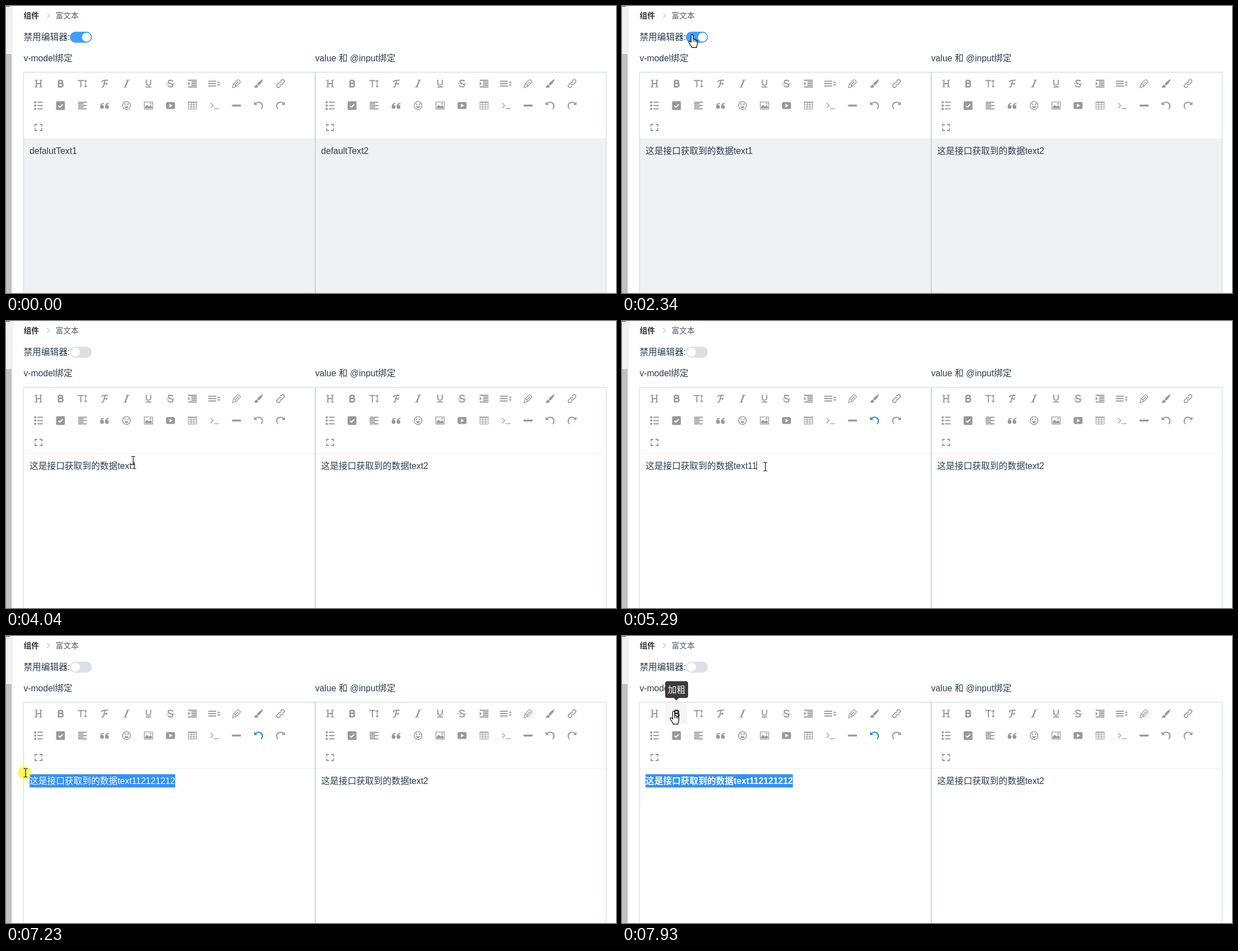
Animation of 1089x514 px, one loop 8000 ms. Source, as an HTML page:

```html
<!DOCTYPE html>
<html lang="zh-CN">
<head>
<meta charset="utf-8">
<title>富文本</title>
<style>
html, body { margin: 0; width: 100%; height: 100%; overflow: hidden; background: #fff; }
svg { display: block; }
text { font: 15.72px "Liberation Sans", Arial, "Noto Sans CJK SC", "Noto Sans CJK", sans-serif; fill: #2c3e50; white-space: pre; }
.crumb { font-size: 13.75px; fill: #515a6e; }
.home { font-weight: 700; fill: #303133; }
.icon { color: #999; fill: none; stroke: currentColor; stroke-width: 2; }
.icon.hover { color: #333; }
.icon.undo { color: #1e88e5; }
.hair { stroke-width: 1; }
.thin { stroke-width: 1.3; }
.mid { stroke-width: 1.6; }
.fat { stroke-width: 3.4; }
.fill { fill: currentColor; stroke: none; }
.cut { fill: none; stroke: #fff; }
.hole { fill: #fff; stroke: none; }
.edge { fill: none; stroke: #c9d8db; }
.bold { font-weight: 700; }
.white { fill: #fff; }
</style>
</head>
<body>
<svg id="stage" width="1089" height="514" viewBox="0 0 1089 514">
  <path d="M0 0H12V514H0Z" fill="#f0f1f1"/>
  <path d="M0 86H10V514H0Z" fill="#c1c1c1"/>
  <path d="M0 0H7V1H0Z" fill="#444"/>
  <text class="crumb home" x="31.4" y="22">组件</text>
  <path d="M73.5 12.5L78 17L73.5 21.5" fill="none" stroke="#b9cdd0" stroke-width="1.2"/>
  <text class="crumb" x="88.4" y="22">富文本</text>
  <text x="31.4" y="61">禁用编辑器:</text>
  <rect id="track" x="114" y="46" width="39.3" height="19.7" rx="9.85"/>
  <circle id="knob" cy="55.9" r="7.9" fill="#fff"/>
  <text x="31.4" y="99">v-model绑定</text>
  <text x="552" y="99">value 和 @input绑定</text>
  <rect id="hoverBox" width="39.3" height="39.3" fill="#f6f6f6"/>
  <path id="areas" d="M32 237H551V514H32ZM553 237H1071V514H553Z" fill="#f0f1f3"/>
  <path class="edge" d="M31.5 514V118.5H551.5V514M552.5 514V118.5H1071.5V514"/>
  <path d="M32 237.5H551M553 237.5H1071" stroke="#eceeee"/>
  <g id="tools"></g>
  <text id="left" x="42" y="265"></text>
  <text id="right" x="562.5" y="265"></text>
  <clipPath id="clip"><rect id="range" y="247.6" height="23.6"/></clipPath>
  <g id="selected" clip-path="url(#clip)">
    <path d="M40 247H320V272H40Z" fill="#3390ff"/>
    <text id="leftSel" class="white" x="42" y="265"></text>
  </g>
  <path id="caret" d="M.5 251V267" stroke="#222"/>
  <g id="tip">
    <rect x="77" y="81" width="41" height="30" rx="4" fill="#3b3b3b"/>
    <path d="M92 110.5H102L97 115.5Z" fill="#3b3b3b"/>
    <text class="white" x="81.8" y="102">加粗</text>
  </g>
  <g id="mouse">
    <circle id="ring" r="12" fill="#fff200" opacity=".6"/>
    <path id="arrow" d="M.5 .5V16.2L4.2 12.7L6.8 18.6L9.2 17.5L6.6 11.8H11.6Z" fill="#fff" stroke="#000"/>
    <g id="hand">
      <path d="M-.6 14V2.2A1.8 1.8 0 0 1 3 2.2V9C3 7.4 6 7.4 6 9V10C6 8.5 8.4 8.7 8.4 10.2V11.2C8.4 9.9 10.5 10 10.5 11.7V17C10.5 20 8.8 21 8.8 23.4H.8C.8 21 -3 18 -4.8 14.2C-5.6 12 -3.4 11.2 -2.2 12.6Z" fill="#fff" stroke="#000" stroke-width="1.2"/>
      <path d="M3 9V13M6 10V13M8.4 11V14" stroke="#000"/>
    </g>
    <path id="beam" d="M-3.5 -7.5H-1L0 -6.7L1 -7.5H3.5M0 -6.7V6.7M-3.5 7.5H-1L0 6.7L1 7.5H3.5" fill="none" stroke="#111" stroke-width="1.2"/>
  </g>
</svg>
<script>
const $ = id => document.getElementById(id);
const path = (d, cls = '') => `<path class="${cls}" d="${d}"/>`;
const LOOP = 8000, CELL = 39.28, TICK = 77.5, TEXT_X = 42, COLS = 12;

// Five evenly spaced bars; each piece of reach is "from H to" for one bar
const bars = (...reach) => path(reach.map(([a, b], i) => `M${a} ${(i - 2) * 2.95}H${b}`).join(''));
const wide = [-7.85, 7.85], short = [-7.85, 2], inset = [-2, 7.85];
const dot = y => `<circle class="fill" cx="-5.9" cy="${y}" r="2"/>` + path(`M-2 ${y}H7.85`);
const quote = x => `<circle class="fill" cx="${x}" cy="2.45" r="3.4"/>` + path(`M${x - 2.4} 2C${x - 2.4} -1.5 ${x - .5} -3.8 ${x + 3.4} -3.9`);
const undo = path('M-7.85 -6.9V-1H-2Z', 'fill') + path('M-5.2 -3.6A6.87 6.87 0 0 1 6.87 1Q6.87 4 4.7 6.2');

const icons = [
  path('M-4 -6V6M4 -6V6M-4 0H4') + path('M-7 -6.2H-1.5M1.5 -6.2H7M-7 6.2H-1.5M1.5 6.2H7', 'thin'),
  `<path stroke-width="2.7" d="M-3.4 -5.6V5.6H1.4A3 3 0 0 0 1.4 -.4H-3.4M-3.4 -5.6H1A2.6 2.6 0 0 1 1 -.4"/>`,
  path('M-8.5 -5.6H2.5M-3 -5.6V6.5') + path('M5.5 -5.5V5.5M3.3 -3.8L5.5 -6.2L7.7 -3.8M3.3 3.8L5.5 6.2L7.7 3.8', 'thin'),
  path('M-5 5.5C-3 7.5 -1.8 5.5 -1 2L1 -5.5') + path('M-4.5 -2.5C-5 -6.3 -1 -5.8 6.5 -6.2M-2 .2H4M4 -1.8V2'),
  `<path stroke-width="2.6" d="M2.4 -6L-2.4 6"/>` + path('M-1 -6.4H5.9M-5.9 6.4H1', 'hair'),
  path('M-3.9 -6.9V-.5C-3.9 4 3.9 4 3.9 -.5V-6.9M-4.9 5.9H4.9'),
  path('M4.2 -3.6C3.6 -7 -4 -6.8 -4 -3.4C-4 .3 4.2 -.6 4.2 3.2C4.2 6.8 -4 6.9 -4.6 3.2') + path('M-7.85 .5H7.85', 'hair'),
  bars(wide, inset, inset, inset, wide) + path('M-7.85 -3L-3.9 0L-7.85 3Z', 'fill'),
  path('M-11 -4.2H3M-11 0H3M-11 4.2H3') + path('M4.5 -1.2L7.5 -4.2L10.5 -1.2ZM4.5 1.2L7.5 4.2L10.5 1.2Z', 'fill'),
  path('M-7.3 7.3L-5.6 .8L2 -6.8C3.5 -8 8 -3.8 6.6 -2.2L-1 5.4ZM-5.6 .8C-3 .8 -1 3 -1 5.4M-3 3L4 -4', 'thin'),
  path('M8.2 -8C4 -6.3 -1.2 -2 -2.6 1L.2 3.6C3 1.6 7.5 -4 8.2 -8ZM-3.6 1.7C-6.4 1.6 -5 5 -8.2 6.2C-5.4 8.8 .4 7.4 -.8 4.2Z', 'fill'),
  [0, 180].map(a => `<g transform="rotate(${a})">${path('M-1.6 1.6A3.1 3.1 0 0 0 2.6 1.4L6.2 -2.2A3 3 0 0 0 2 -6.4L-.3 -4.2', 'mid')}</g>`).join(''),
  [-5.9, 0, 5.9].map(dot).join(''),
  '<rect class="fill" x="-7.85" y="-7.85" width="15.7" height="15.7" rx="2"/>' + path('M-3.5 .4L-1 2.9L3.9 -2', 'cut'),
  bars(wide, short, wide, short, wide),
  quote(-4.4) + quote(4.4),
  '<circle class="mid" r="7"/>' + path('M-3.8 1.2H3.8C3.2 5.8 -3.2 5.8 -3.8 1.2Z', 'fill') + path('M-2.6 -3.8V-1M2.6 -3.8V-1'),
  path('M-7.4 -6.4H7.4V6.4H-7.4Z', 'thin') + path('M-6 5V2.5L-2.5 -1.5L.5 2L3.5 -.5L6 2V5ZM2 -3.2A1.5 1.5 0 1 0 5 -3.2A1.5 1.5 0 1 0 2 -3.2Z', 'fill'),
  '<rect class="fill" x="-8" y="-6.3" width="16" height="12.6" rx="3"/>' + path('M-2 -3.4L3.6 0L-2 3.4Z', 'hole'),
  path('M-7.85 -5.9H7.85') + path('M-7.4 -5.9V6.4H7.4V-5.9M-7.4 -1.5H7.4M-7.4 2.45H7.4M-2.45 -5.9V6.4M2.45 -5.9V6.4', 'hair'),
  path('M-7 -4.5L-2.4 0L-7 4.5M-1 5.6H8', 'thin'),
  path('M-8 0H8', 'fat'),
  undo,
  `<g transform="scale(-1 1)">${undo}</g>`,
  path('M-6 -1.8V-5.5H-2M2 -5.5H6V-1.8M6 1.8V5.5H2M-2 5.5H-6V1.8')
];
$('tools').innerHTML = [58, 578.5].map(x0 => icons.map((art, i) =>
  `<g class="icon" transform="translate(${x0 + i % COLS * CELL} ${139 + Math.floor(i / COLS) * CELL})">${art}</g>`
).join('')).join('');
const tools = [...$('tools').children].slice(0, icons.length);

// Pointer moves: begin, end, x and y reached
const moves = [
  [230, 540, 257, 264], [1090, 1560, 124, 51], [3670, 4040, 227, 250], [4120, 4210, 256, 261],
  [5670, 5750, 294, 264], [5900, 6060, 292, 243], [6310, 6390, 311, 251], [6620, 6620, 310, 259],
  [6690, 7000, 35, 245], [7380, 7380, 39.5, 168], [7470, 7630, 91, 134.5]
];
const presses = [[3430, 3510], [4350, 4430], [6620, 7300], [7870, 7930]];
const bursts = [[5290, 2], [5600, 2], [5900, 3], [6310, 1]]; // begin, digits

const within = (t, [a, b]) => t >= a && t < b;
const clamp = (v, lo, hi) => Math.min(hi, Math.max(lo, v));
const show = (id, on) => $(id).setAttribute('display', on ? 'inline' : 'none');
const set = (id, name, value) => $(id).setAttribute(name, value);
const mix = (a, b, k) => a + (b - a) * k;

// The pointer is seen only once per tick and slows towards each goal
function pointerAt(t) {
  let x = 965, y = 543;
  for (const [begin, end, goalX, goalY] of moves) {
    if (t < begin) break;
    const steps = Math.round((end - begin) / TICK) + 1;
    const k = t >= end ? 1 : (Math.floor((t - begin) / TICK + .05) + 1) / steps;
    const eased = 1 - (1 - k) ** 1.5;
    x = mix(x, goalX, eased);
    y = mix(y, goalY, eased);
  }
  return { x, y };
}

function toolAt({ x, y }) {
  const col = Math.floor((x - 38.4) / CELL), row = Math.floor((y - 119) / CELL);
  const i = row * COLS + col;
  return col >= 0 && col < COLS && row >= 0 && i < icons.length ? i : -1;
}

function drawText(t) {
  const loaded = t >= 2340;
  const typed = bursts.reduce((sum, [begin, n]) => sum + clamp(Math.floor((t - begin) / 75) + 1, 0, n), 0);
  const words = loaded ? '这是接口获取到的数据text1' + '12'.repeat(4).slice(0, typed) : 'defalutText1';
  for (const id of ['left', 'leftSel']) {
    $(id).textContent = words;
    $(id).classList.toggle('bold', t >= 7930);
  }
  $('right').textContent = loaded ? '这是接口获取到的数据text2' : 'defaultText2';

  const edge = n => TEXT_X + (n ? $('left').getSubStringLength(0, n) : 0);
  const end = edge(words.length), dragging = t >= 6690;
  show('caret', within(t, [4350, 4900]) || within(t, [5290, 6690]));
  set('caret', 'transform', `translate(${Math.round(end - .6)} 0)`);
  show('selected', dragging);
  if (dragging) {
    const { x } = pointerAt(Math.min(t, 7000));
    let first = 0;
    while (edge(first) < x + 3) first++;
    set('range', 'x', edge(first));
    set('range', 'width', end - edge(first));
  }
}

function drawSwitch(t) {
  const k = clamp((t - 3510) / 300, 0, 1), off = k * k * (3 - 2 * k);
  set('knob', 'cx', mix(143.6, 124, off));
  set('track', 'fill', `rgb(${mix(64, 220, off)},${mix(158, 223, off)},${mix(255, 230, off)})`);
  show('areas', t < 3590);
}

function drawPointer(t) {
  const p = pointerAt(t), tool = toolAt(p), enabled = t >= 3590;
  const onSwitch = within(p.x, [114, 154]) && within(p.y, [46, 66]);
  const kind = onSwitch || tool >= 0 ? 'hand' : enabled && p.y > 238 ? 'beam' : 'arrow';
  const hover = enabled ? tool : -1;
  show('mouse', t >= moves[0][0]);
  set('mouse', 'transform', `translate(${p.x} ${p.y})`);
  for (const id of ['arrow', 'hand', 'beam']) show(id, id === kind);
  show('ring', presses.some(span => within(t, span)));
  set('ring', 'cx', kind === 'beam' ? -2 : 0);

  show('hoverBox', hover >= 0);
  set('hoverBox', 'x', 38.4 + hover % COLS * CELL);
  set('hoverBox', 'y', 119 + Math.floor(hover / COLS) * CELL);
  tools.forEach((icon, i) => icon.classList.toggle('hover', i === hover));
  tools[22].classList.toggle('undo', t >= 4600);
  show('tip', t >= 7870);
}

const start = performance.now();
function frame() {
  const t = (performance.now() - start) % LOOP;
  drawText(t);
  drawSwitch(t);
  drawPointer(t);
  requestAnimationFrame(frame);
}
frame();
</script>
</body>
</html>
```
